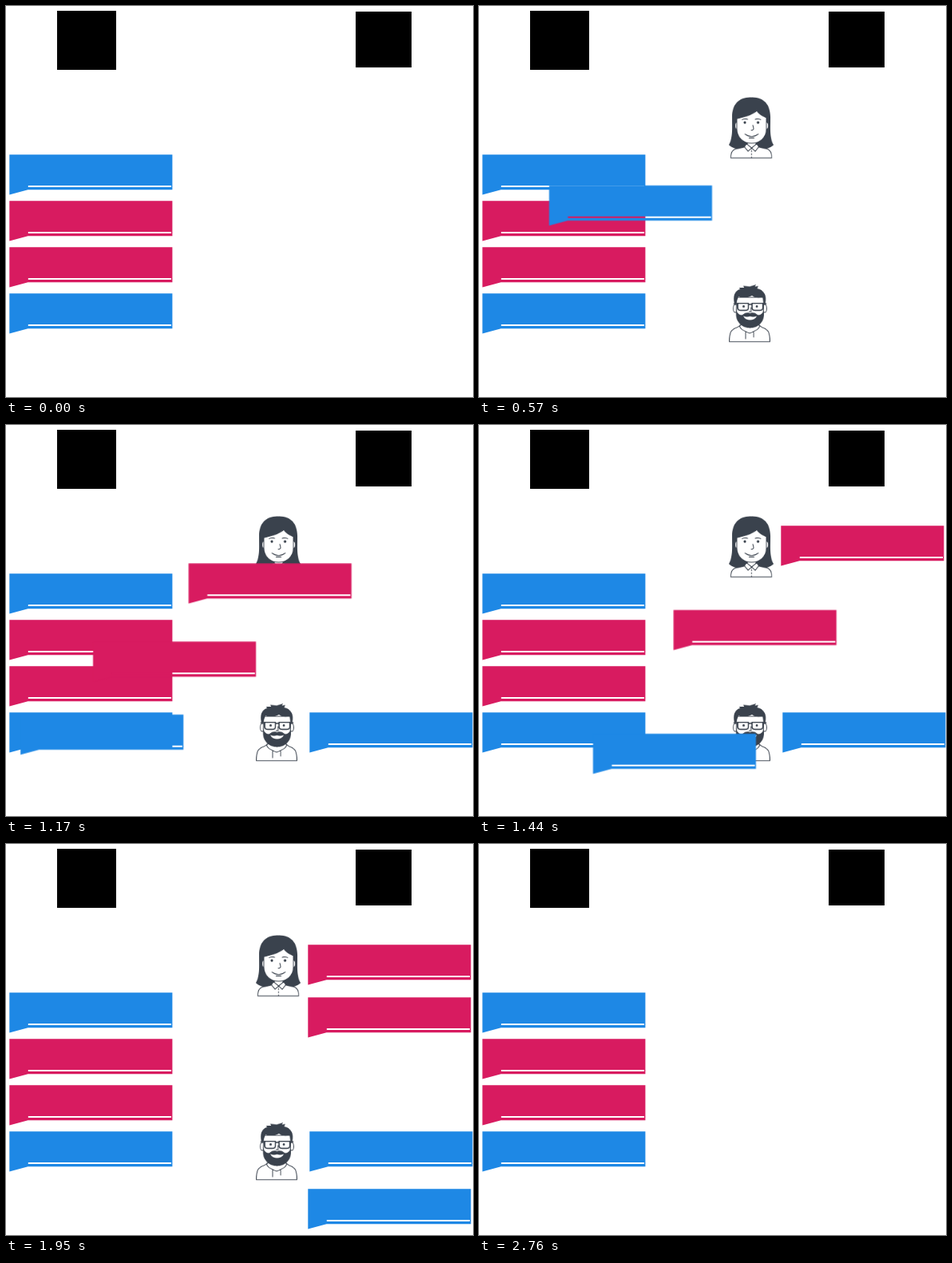
An HTML page that plays this animation: 585x490 px, repeating every 3.27 s.

```html
<!DOCTYPE html>
<html lang="en">
<head>
<meta charset="utf-8">
<title>Messages sorted by sender</title>
<style>
  html, body { margin: 0; width: 100%; height: 100%; overflow: hidden; background: #fff; }
  svg { display: block; width: 585px; height: 490px; }
  .avatar { transform-box: fill-box; transform-origin: center; opacity: 0; }
  .ink { fill: #3a424d; }
  .line { fill: none; stroke: #3a424d; stroke-width: 1; stroke-linecap: round; stroke-linejoin: round; }
  .bold { stroke-width: 1.5; }
  .skin { fill: #fff; stroke: #3a424d; stroke-width: 1; stroke-linejoin: round; }
  .blue { fill: #1e88e5; }
  .pink { fill: #d81b60; }
</style>
</head>
<body>
<svg viewBox="0 0 585 490">
  <defs>
    <!-- the rule near the bottom is a see-through slot -->
    <path id="bubble" fill-rule="evenodd" d="M.3 .2H204.400V44.200H23.500L.3 50.600ZM23.800 39.100H203V41.100H23.800Z"/>
  </defs>

  <rect x="64" y="6" width="74" height="74"/>
  <rect x="438" y="7" width="70" height="70"/>

  <g id="rows"></g>

  <g class="avatar">
    <path class="ink" d="M341 114.500C326 114 317 123 317 139C317 156 318 165 313 174C318 179 326 180 333 179H349C356 180 364 179 369 174C364 165 365 156 365 139C365 124 357 114 341 114.500Z"/>
    <path class="skin" d="M315.500 190.500C315.500 182 318 179.500 325 178.500L336 176V169H347V176L358 178.500C364 179.500 366.500 182 366.500 190.500Z"/>
    <ellipse class="skin" cx="323" cy="150" rx="2.500" ry="4.500"/>
    <ellipse class="skin" cx="360" cy="150" rx="2.500" ry="4.500"/>
    <path class="skin" d="M323 141C333 139 343 136 348 131C351 136 356 138 360 140V154C360 166 351 172 341.500 172C332 172 323 166 323 154Z"/>
    <path class="skin" d="M335 172.500L341.500 178L337 182L332.500 176.500ZM348 172.500L341.500 178L346 182L350.500 176.500Z"/>
    <path class="line" d="M329.500 142.500Q333 140.500 336.500 142M346 142Q349.500 140.500 353 142.500M343 149.500L344 154Q343 156 341 155.500M333 160.500Q341.500 166.500 350 160.500M338.500 165.500H344.500"/>
    <path class="line" stroke-dasharray="1.500 2.500" d="M341.500 181V190"/>
    <circle class="ink" cx="333" cy="146" r="1.600"/>
    <circle class="ink" cx="349.500" cy="146" r="1.600"/>
  </g>

  <g class="avatar">
    <path class="skin" d="M313.500 420.500C313.500 409 316 405 323 403L331 398H348L355 403C362 405 364.500 409 364.500 420.500Z"/>
    <path class="line" d="M327 400Q325 405 339 410Q353 405 351 400M334 408V417M344 408V415"/>
    <ellipse class="skin" cx="321" cy="379" rx="2.500" ry="5"/>
    <ellipse class="skin" cx="358" cy="379" rx="2.500" ry="5"/>
    <path class="skin" d="M322.500 365H356.500V382C356.500 395 348 403 339.500 403C331 403 322.500 395 322.500 382Z"/>
    <path class="ink" d="M320 373C318 364 320 357 327 355L326 353L332 353L331 350.500L339 351.500L347 349L345.500 351.500L350 351L348.500 354C357 356 361 363 358.500 373H357L355 365C349 367 345 365 342 363C336 366 329 366 325 364L322 373Z"/>
    <path class="ink" d="M322 379C323 385 326 388 330 387Q335 383 339.500 385Q344 383 349 387C353 388 356 385 357 379V388C356 397 349 403.500 339.500 403.500C330 403.500 323 397 322 388Z"/>
    <path fill="#fff" d="M331 388.500Q335 390.500 339.500 389Q344 390.500 348 388.500Q345.500 393.500 339.500 393.500Q333.500 393.500 331 388.500Z"/>
    <path class="line bold" d="M324 372.500H337.500V378Q337.500 381.500 334 381.500H327.500Q324 381.500 324 378ZM342 372.500H355.500V378Q355.500 381.500 352 381.500H345.500Q342 381.500 342 378ZM337.500 374.500Q339.800 373 342 374.500M319.500 373H324M355.500 373H359.500"/>
    <path class="line" d="M340.500 378L341 383H338.500"/>
    <circle class="ink" cx="331.500" cy="376.500" r="1.500"/>
    <circle class="ink" cx="348" cy="376.500" r="1.500"/>
  </g>

  <g id="movers"></g>
</svg>
<script>
const LOOP = 3270;
const FADE = [2640, 2760];

// colour, start y, end x, end y, leaves at, arrives at
const messages = [
  ['blue', 186, 380, 360, 450, 990],
  ['pink', 244, 378, 126, 810, 1410],
  ['pink', 302, 378, 192, 960, 1710],
  ['blue', 360, 378, 432, 1140, 1950]
];

// time, scale
const pop = [[60, 0], [240, 1.27], [345, 0.94], [425, 1]];

function play(el, prop, steps) {
  const all = [[0, steps[0][1]], ...steps, [LOOP, steps[steps.length - 1][1]]];
  el.animate(
    all.map(([ms, value]) => ({ offset: ms / LOOP, [prop]: value })),
    { duration: LOOP, iterations: Infinity, easing: `steps(${LOOP / 30})` }
  );
}

function show(el, from) {
  play(el, 'opacity', [[from, 0], [from, 1], [FADE[0], 1], [FADE[1], 0]]);
}

const at = (x, y) => `translate(${x}px, ${y}px)`;

function addBubble(parent, color, x, y) {
  const use = document.createElementNS('http://www.w3.org/2000/svg', 'use');
  use.setAttribute('href', '#bubble');
  use.setAttribute('class', color);
  use.style.transform = at(x, y);
  document.getElementById(parent).append(use);
  return use;
}

for (const [color, y, endX, endY, leave, arrive] of messages) {
  addBubble('rows', color, 4, y);
  const mover = addBubble('movers', color, 4, y);
  show(mover, leave);
  play(mover, 'transform', [[leave, at(4, y)], [arrive, at(endX, endY)]]);
}

for (const avatar of document.querySelectorAll('.avatar')) {
  show(avatar, pop[0][0]);
  play(avatar, 'transform', pop.map(([ms, s]) => [ms, `scale(${s})`]));
}
</script>
</body>
</html>
```
